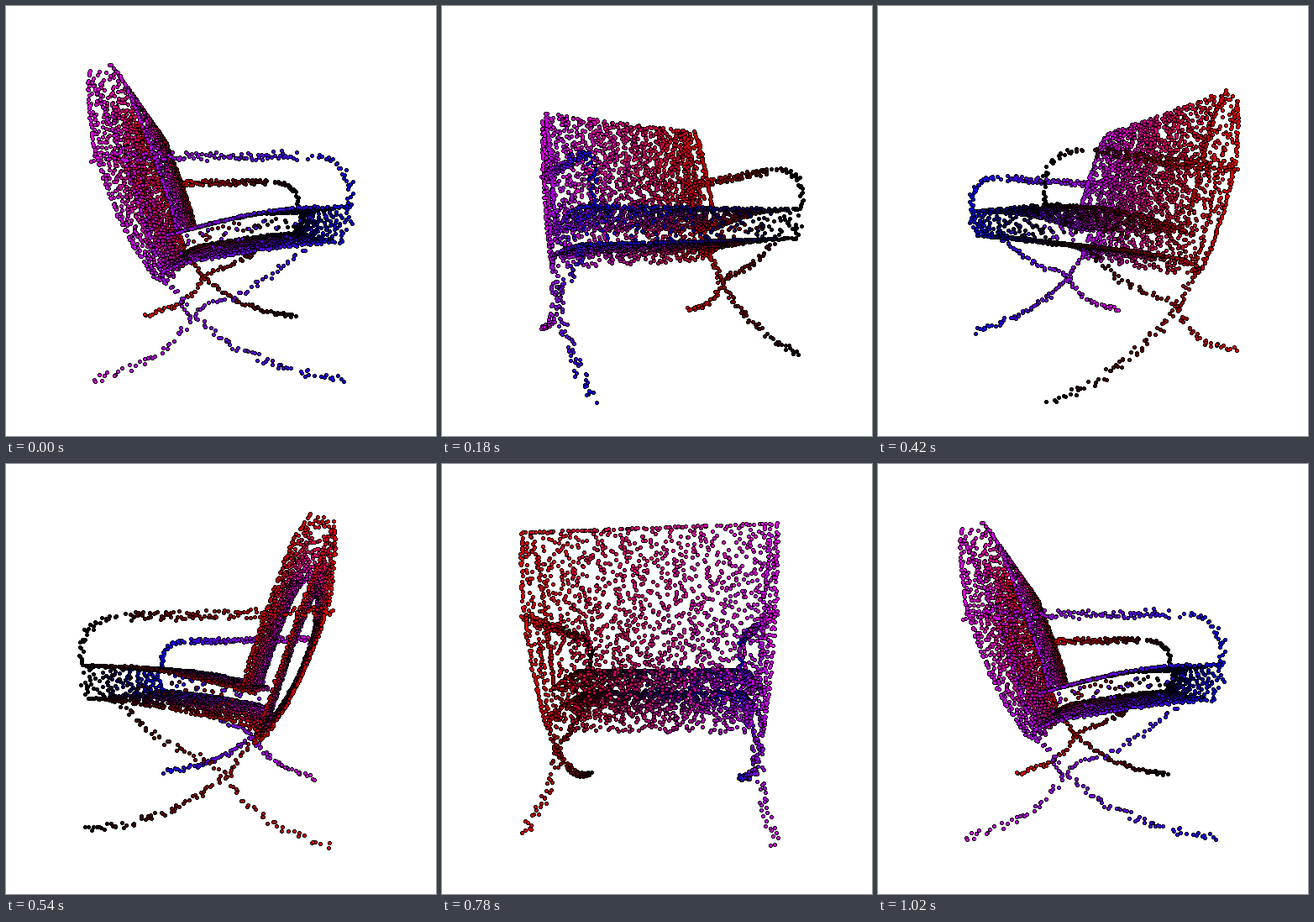
A matplotlib script that plays this animation: 512x512 px, repeating every 1080 ms.

```python
import numpy as np
import matplotlib.pyplot as plt
from matplotlib.animation import FuncAnimation

SIZE = 512
STEPS = 17          # steps in a full turn; the last frame meets the first
FOCAL = 443.4       # 60 degree field of view
HALF = 114          # half the width of the chair
GOLDEN = 0.618034

rng = np.random.default_rng(7)

# Side profiles as (forward, up)
BACK = [(-117, 133), (-118, 112), (-114, 68), (-104, 36), (-92, 6), (-78, -22), (-60, -49), (-48, -56)]
FRONT = [(-98, 140), (-83, 118), (-64, 69), (-51, 32), (-45, 14), (-40, -6)]
MIDDLE = [(-115, 125), (-88, 58), (-62, -20), (-50, -54)]
RIM = [(-98, 140), (-117, 133)]
SEAT_TOP = [(115, 13), (63, 12), (30, 7), (3, 1), (-49, -12)]
SEAT_LOW = [(108, -18), (70, -21), (25, -27), (-34, -37), (-52, -45)]
SEAT_MID = [(105, -3), (30, -9), (-45, -22)]
SEAT_FACE = [(115, 13), (118, 0), (108, -18)]
ARM = [(-117, 57), (68, 58)]
ARM_BEND = [(78, 58), (96, 56), (108, 46), (115, 33), (114, 14)]
LEG_A = [(-116, -142), (-97, -136), (-72, -127), (-53, -115), (-38, -102), (-27, -85),
         (-8, -72), (11, -67), (46, -49), (62, -34), (74, -23)]
LEG_B = [(111, -142), (90, -138), (63, -133), (36, -124), (13, -112), (-10, -97),
         (-27, -84), (-37, -68), (-46, -56)]


def along(path, t):
    """Points at the fractions t of a polyline's length."""
    p = np.array(path, float)
    s = np.r_[0, np.cumsum(np.hypot(*np.diff(p, axis=0).T))]
    return np.interp(t * s[-1], s, p[:, 0]), np.interp(t * s[-1], s, p[:, 1])


def sheet(path, n):
    """Evenly scattered points on a profile swept across the width."""
    i = np.arange(n)
    u, h = along(path, (i + rng.random(n)) / n)
    v = (i * GOLDEN + rng.uniform(0, 0.12, n)) % 1
    return np.c_[u, HALF * (2 * v - 1), h]


def rails(path, n, spread):
    """The same bar on both sides, with a (forward, side, up) thickness."""
    sides = []
    for v in (-HALF, HALF):
        u, h = along(path, (np.arange(n) + rng.random(n)) / n)
        bar = np.c_[u, np.full(n, v * 0.985), h]
        sides.append(bar + rng.uniform(-1, 1, (n, 3)) * spread)
    return np.vstack(sides)


edge = (0.8, 1.5, 0.8)
leg = (2.5, 5, 2.5)
cloud = np.vstack([
    sheet(BACK, 720), sheet(FRONT, 580), sheet(MIDDLE, 330), sheet(RIM, 90),
    sheet(SEAT_TOP, 560), sheet(SEAT_LOW, 620), sheet(SEAT_FACE, 110),
    rails(BACK, 65, edge), rails(FRONT, 55, edge), rails(MIDDLE, 45, edge),
    rails(SEAT_TOP, 50, edge), rails(SEAT_LOW, 50, edge), rails(SEAT_MID, 32, (5, 4, 9)),
    rails(ARM, 115, (1, 4, 4)), rails(ARM_BEND, 30, (2, 4, 2)),
    rails(LEG_A, 70, leg), rails(LEG_B, 66, leg),
])
U, V, H = cloud.T
color = np.clip(np.c_[(117 - U) / 234, 0 * U, (V + 117) / 234], 0, 1)

# Ball stamp: pixel offsets, brightness and bulge towards the viewer
gy, gx = np.mgrid[-2:3, -2:3]
inside = gx**2 + gy**2 <= 5
dx, dy = gx[inside], gy[inside]
d2 = dx**2 + dy**2
shade = np.interp(d2, [0, 1, 2, 4, 5], [1, 0.93, 0.8, 0.15, 0])
bulge = 4 * np.sqrt(1 - d2 / 5.5)
paint = color[:, None, :] * shade[None, :, None]


def render(i):
    a = 2 * np.pi * i / STEPS
    right = U * np.cos(a) - V * np.sin(a)
    near = U * np.sin(a) + V * np.cos(a)
    k = FOCAL / (FOCAL - near)
    x = np.rint(SIZE / 2 + right * k).astype(int)[:, None] + dx
    y = np.rint(SIZE / 2 - H * k).astype(int)[:, None] + dy
    order = np.argsort((near[:, None] + bulge).ravel(), kind="stable")
    img = np.ones((SIZE, SIZE, 3))
    img[y.ravel()[order], x.ravel()[order]] = paint.reshape(-1, 3)[order]
    return img


fig = plt.figure(figsize=(5.12, 5.12), dpi=100, facecolor="white")
ax = fig.add_axes([0, 0, 1, 1])
ax.axis("off")
picture = ax.imshow(render(0), interpolation="nearest", aspect="auto")


def update(i):
    picture.set_data(render(i))
    return [picture]


anim = FuncAnimation(fig, update, frames=STEPS + 1, interval=60, repeat=True, repeat_delay=0)
plt.show()
```
